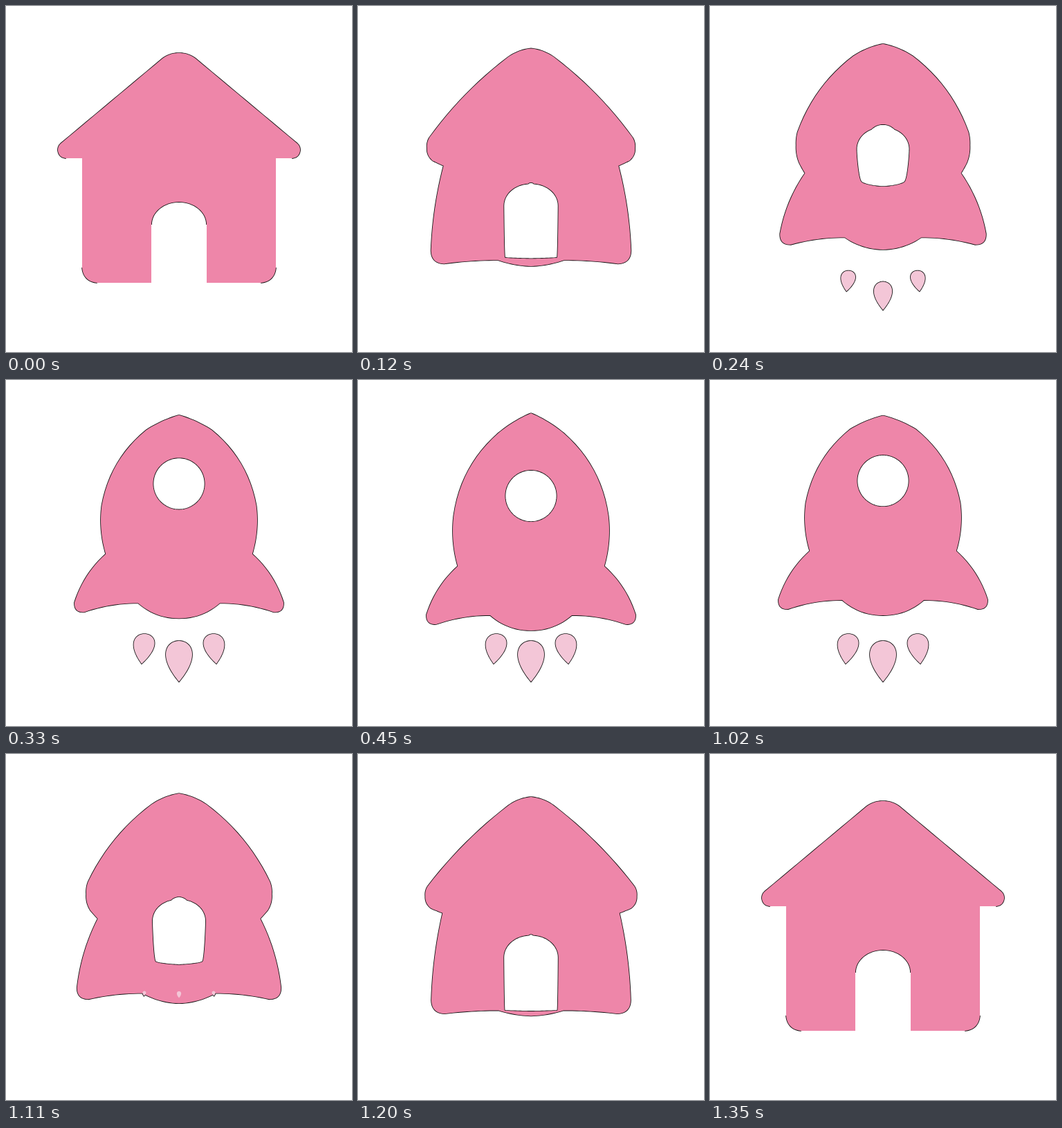
Recreate the animation shown at these times as an HTML page. Size 500 by 500 pixels, loop 1.86 s.

```html
<!DOCTYPE html>
<html lang="en">
<head>
<meta charset="utf-8">
<title>House to rocket</title>
<style>
  html, body { margin: 0; width: 100%; height: 100%; overflow: hidden; background: #fff; }
  svg { display: block; width: 100%; height: 100%; }
  .line { fill: none; stroke: #111; stroke-width: 1.7; }
  #shape { fill: #ee86a9; fill-rule: evenodd; }
  #flames { fill: #f3c6d7; }
</style>
</head>
<body>
<svg viewBox="0 0 500 500">
  <path id="flameLine" class="line"/>
  <path id="shapeLine" class="line"/>
  <path id="shape"/>
  <path id="flames"/>
</svg>
<script>
const LOOP = 1860, TICK = 30, CENTER = 250;
const PEAK = 10, END = 15;   // steps: rocket at its highest, rocket settled
const RISE = 22;             // how far the rocket overshoots upwards
const TOP = 48;              // nose of the rocket

const el = id => document.getElementById(id);
const mix = (a, b, k) => a + (b - a) * k;
const clamp = k => Math.max(0, Math.min(1, k));
const smooth = k => k * k * (3 - 2 * k);
const blend = (a, b, k) => a.map((p, i) => p.map((v, j) => mix(v, b[i][j], k)));
const range = (n, fn) => Array.from({ length: n }, (_, i) => fn(i));

// Right half of each outline, top to bottom: x offset, y, bulge of the edge that follows.
const HOUSE = [
  [0, 68, .085], [24, 76, 0], [170, 198, .13], [175, 209, .2], [163, 220, 0],
  [140, 220, 0], [140, 378, .207], [118, 400, 0], [40, 400, 0], [0, 400, 0]
];

// The rocket's hull is a circular arc, widest at y = 218.
const hull = (y, bulge) => [Math.sqrt(184.4 ** 2 - (y - 218) ** 2) - 71.4, y, bulge];
const ROCKET = [
  hull(TOP, .037), hull(77, .092), hull(195, .016), hull(218, .022), hull(250, .013),
  hull(269, .068), [151, 339, .28], [137, 353, -.043], [59, 340, .094], [0, 362, 0]
];

// At the peak the hull is squashed: the nose lags while the rest is lifted.
const LIFTED = ROCKET.map(([x, y, bulge]) => {
  const lag = 3.5 - (RISE + 3.5) * Math.sqrt(clamp((y - TOP) / 220));
  return [x, y + lag, bulge];
});

// Sampled outline through the key points, each edge bowed outwards by its bulge.
function bowed(keys) {
  const edges = keys.slice(0, -1).flatMap(([x, y, bulge], i) => {
    const [x2, y2] = keys[i + 1], dx = x2 - x, dy = y2 - y;
    return range(12, n => {
      const k = n / 12, bow = 4 * k * (1 - k) * bulge;
      return [x + dx * k + dy * bow, y + dy * k - dx * bow];
    });
  });
  return [...edges, keys[keys.length - 1]];
}

// Arched door, q from 0 (top) to 4 (bottom): apex, arch, side, sill.
function door(q) {
  const part = Math.min(3, Math.floor(q)), k = q - part, a = k * Math.PI / 2;
  if (part === 0) return [0, -58.5];
  if (part === 1) return [40 * Math.sin(a), -25.5 - 33 * Math.cos(a)];
  if (part === 2) return [40, mix(-25.5, 58.5, smooth(k))];
  return [40 * (1 - smooth(k)), 58.5];
}

function porthole(q) {
  const a = q * Math.PI / 4;
  return [37.5 * Math.sin(a), -37.5 * Math.cos(a)];
}

const DOOR = range(65, i => door(i / 16));
const PORTHOLE = range(65, i => porthole(i / 16));

function mirrored(half, y = 0) {
  const right = half.map(([px, py]) => [CENTER + px, y + py]);
  const left = half.slice(0, -1).reverse().map(([px, py]) => [CENTER - px, y + py]);
  return right.concat(left);
}

const fmt = p => p.map(v => v.toFixed(2)).join(" ");
const pathOf = points => "M" + points.map(fmt).join("L") + "Z";

// Level and upright edges carry no line.
function lineOf(points) {
  return points.map((p, i) => {
    const last = points[i - 1];
    const plain = !last || p.some((v, axis) => Math.abs(v - last[axis]) < .005);
    return (plain ? "M" : "L") + fmt(p);
  }).join("");
}

function flame(x, y, w, h, lean, scale) {
  return pathOf(range(60, i => {
    const a = i / 60 * 2 * Math.PI, dy = -Math.cos(a);
    const dx = w / .77 * Math.sin(a) * Math.abs(Math.cos(a / 2)) + lean * ((1 + dy) / 2) ** 2;
    return [x + dx * scale, y + dy * h * scale];
  }));
}

const backOut = k => 1 + 2.7 * (k - 1) ** 3 + 1.7 * (k - 1) ** 2;

function stepAt(time) {
  const t = Math.floor(time / TICK) * TICK;
  return t < 930 ? Math.min(t / TICK, END) : END * clamp((1350 - t) / 450) ** 1.3;
}

function draw(time) {
  const s = stepAt(time);
  const morph = clamp(s / PEAK), settle = clamp((s - PEAK) / (END - PEAK));
  const body = mirrored(bowed(blend(blend(HOUSE, LIFTED, morph), ROCKET, settle * (morph === 1))));

  const opened = morph ** 2;
  const openingY = mix(341.5, 167.5 - RISE, opened) + RISE * settle;
  const opening = mirrored(blend(DOOR, PORTHOLE, opened), openingY);
  el("shape").setAttribute("d", pathOf(body) + pathOf(opening));
  el("shapeLine").setAttribute("d", lineOf(body) + lineOf(opening));

  const scale = clamp((s - 6.2) / 2.6), drop = backOut(scale);
  const sideY = mix(280, 388.5, drop);
  const flames = scale > 0
    ? flame(CENTER, mix(256, 406.5, drop), 19, 29.5, 0, scale) +
      [-1, 1].map(side => flame(CENTER + 50 * side, sideY, 15, 21.5, 4 * side, scale)).join("")
    : "";
  el("flames").setAttribute("d", flames);
  el("flameLine").setAttribute("d", flames);
}

const start = performance.now();
function loop() {
  draw((performance.now() - start) % LOOP);
  requestAnimationFrame(loop);
}
loop();
</script>
</body>
</html>
```
